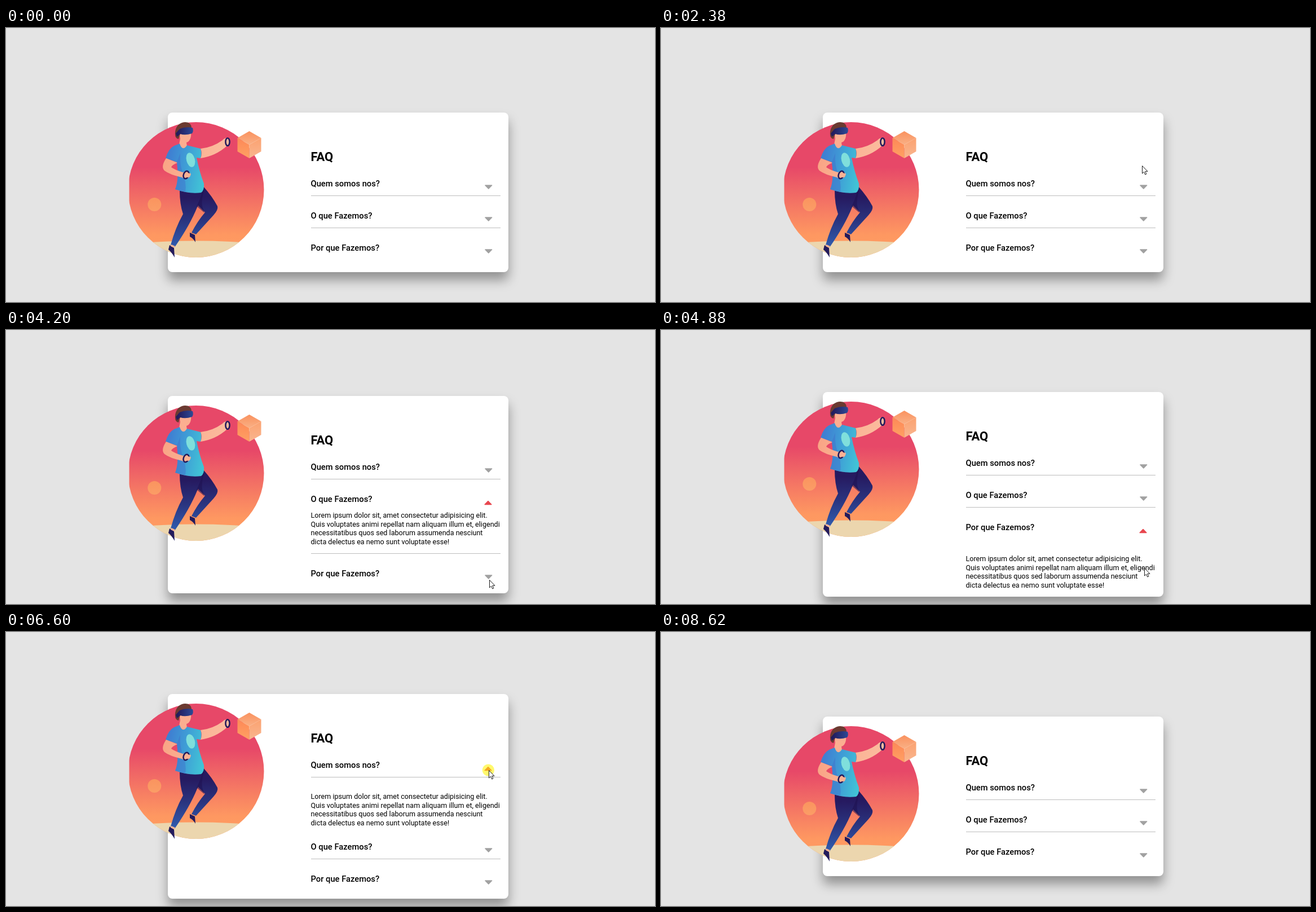
Write an HTML page with a canvas that moves like this. It is 1151 px wide and 486 px high and loops after 9220 ms.

```html
<!DOCTYPE html>
<html lang="pt">
<head>
<meta charset="utf-8">
<title>FAQ</title>
<style>
html, body { margin: 0; width: 100%; height: 100%; overflow: hidden; background: #e4e4e4; }
canvas { position: absolute; left: 0; top: 0; width: 1151px; height: 486px; }
h2, h3, p {
  position: absolute; left: 540.5px; margin: 0; white-space: nowrap;
  font-family: Roboto, "Noto Sans", sans-serif; color: #000;
}
h2 { font-size: 22px; font-weight: 700; line-height: 26px; }
h3 { font-size: 14.72px; font-weight: 500; line-height: 18px; }
p { font-size: 12.6px; font-weight: 400; line-height: 15.5px; }
</style>
</head>
<body>
<canvas id="scene"></canvas>
<h2>FAQ</h2>
<h3>Quem somos nos?</h3>
<h3>O que Fazemos?</h3>
<h3>Por que Fazemos?</h3>
<p>Lorem ipsum dolor sit, amet consectetur adipisicing elit.<br>Quis voluptates animi repellat nam aliquam illum et, eligendi<br>necessitatibus quos sed laborum assumenda nesciunt<br>dicta delectus ea nemo sunt voluptate esse!</p>
<canvas id="pointer"></canvas>
<script>
const W = 1151, H = 486, LOOP = 9220, REST_TOP = 150;
const dpr = window.devicePixelRatio || 1;

function context(id) {
  const c = document.getElementById(id);
  c.width = W * dpr;
  c.height = H * dpr;
  const g = c.getContext('2d');
  g.scale(dpr, dpr);
  return g;
}
const scene = context('scene'), pointer = context('pointer');
const title = document.querySelector('h2');
const questions = [...document.querySelectorAll('h3')];
const answer = document.querySelector('p');

// Card geometry per open item (0 = all closed)
const layouts = [
  { top: 150, height: 283, extra: 0 },
  { top: 110, height: 363, extra: 88, gap: 57 },
  { top: 117, height: 350, extra: 75, gap: 30 },
  { top: 110, height: 363, extra: 88, gap: 57 }
];

// [time, open item]
const toggles = [[0, 0], [1440, 1], [2380, 0], [3380, 2], [4540, 3], [5580, 2], [6270, 1], [6670, 0]];

// [from, to, strength] of the click highlight
const presses = [
  [1310, 1440, .57], [2300, 2380, .57], [3250, 3380, .57], [4470, 4540, .57],
  [5450, 5580, .57], [5580, 5650, .5], [6200, 6270, .57], [6600, 6670, .57]
];

const smooth = u => u * u * (3 - 2 * u);
const linear = u => u;

// Pointer moves: the position advances in equal ticks from first to last
const moves = [
  { from: 400, to: 1110, ticks: 11, ease: smooth, path: [[1006, 468], [945, 380], [880, 300], [857, 278]] },
  { from: 1620, to: 2100, ticks: 7, ease: smooth, path: [[857, 278], [856, 262], [853, 244]] },
  { from: 2500, to: 3180, ticks: 10, ease: smooth, path: [[853, 244], [855, 290], [855, 332]] },
  { from: 3580, to: 3720, ticks: 3, ease: smooth, path: [[855, 332], [855, 316]] },
  { from: 3920, to: 4200, ticks: 5, ease: smooth, path: [[855, 316], [847, 380], [857, 443]] },
  { from: 4740, to: 5380, ticks: 11, ease: smooth, path: [[857, 443], [857, 370], [853, 290]] },
  { from: 5850, to: 6130, ticks: 5, ease: smooth, path: [[853, 290], [854, 265], [856, 245]] },
  { from: 6870, to: 7780, ticks: 14, ease: linear,
    path: [[856, 245], [780, 157], [630, 200], [568, 320], [630, 404], [698, 370]] },
  { from: 7850, to: 8620, ticks: 12, ease: linear,
    path: [[698, 370], [770, 295], [880, 273], [1010, 350], [1115, 484]] }
];

// Catmull-Rom point on a list of points
function along(pts, u) {
  const n = pts.length - 1, s = Math.min(u * n, n - 1e-6), i = Math.floor(s), t = s - i;
  const at = k => pts[Math.max(0, Math.min(n, k))];
  return [0, 1].map(k => {
    const a = at(i - 1)[k], b = at(i)[k], c = at(i + 1)[k], d = at(i + 2)[k];
    return b + t * (c - a + t * (2 * a - 5 * b + 4 * c - d + t * (3 * (b - c) + d - a))) / 2;
  });
}

function pointerAt(t) {
  if (t < 400 || t >= 8620) return null;
  const m = moves.filter(m => t >= m.from).pop();
  const tick = Math.floor((t - m.from) / (m.to - m.from) * (m.ticks - 1) + 1e-6) + 1;
  return along(m.path, m.ease(Math.min(1, tick / m.ticks)));
}

function gradient(x0, y0, x1, y1, ...colors) {
  const g = scene.createLinearGradient(x0, y0, x1, y1);
  colors.forEach((c, i) => g.addColorStop(i / (colors.length - 1), c));
  return g;
}
function shape(d, fill) {
  scene.fillStyle = fill;
  scene.fill(new Path2D(d));
}
function oval(g, x, y, rx, ry, tilt, fill, line) {
  g.beginPath();
  g.ellipse(x, y, rx, ry, tilt, 0, 7);
  if (line) {
    g.lineWidth = line;
    g.strokeStyle = fill;
    g.stroke();
  } else {
    g.fillStyle = fill;
    g.fill();
  }
}

const sunset = gradient(0, 167, 0, 407, '#e74868', '#e74868', '#e74868', '#ef6466', '#f77f63', '#fe9861', '#ff9c60');
const trousers = gradient(0, 300, 0, 385, '#261a60', '#2a3580', '#3059ab');
const shirt = gradient(288, 240, 352, 250, '#3f80d2', '#3f9fd6', '#41c3d6');
const skin = gradient(280, 200, 395, 225, '#f9a283', '#fbb294', '#fbbd9f');
const navy = '#231b5c';

function drawArt() {
  scene.save();
  scene.beginPath();
  scene.rect(218.5, 150, 260, 270);
  scene.clip();

  scene.save();
  oval(scene, 337, 287, 120.5, 120, 0, sunset);
  scene.clip();
  shape('M218 383Q337 372 458 383V410H218Z', '#ecd6ae');
  scene.restore();
  oval(scene, 263.3, 313, 12, 12, 0, gradient(0, 301, 0, 325, '#fa945f', '#fb9d66'));

  shape('M431.500 183L452.500 195L431.500 207L410.500 195Z', gradient(0, 183, 0, 207, '#fa925f', '#f9b085'));
  shape('M410.500 195L431.500 207V231L410.500 219Z', gradient(0, 195, 0, 231, '#fd8857', '#ffa163'));
  shape('M452.500 195L431.500 207V231L452.500 219Z', gradient(0, 195, 0, 231, '#fba271', '#f9b68f'));

  // Legs and shoes
  shape('M328 290L350 281Q366 299 375 316Q377 322 368 332L337 366L329 363Q340 342 353 327L338 312Z', trousers);
  shape('M326 363L335 367L336 380Q332 373 326 370Z', navy);
  shape('M308 288Q328 295 348 290Q346 306 339 318Q326 350 299 389L292 385Q300 355 314 330Q308 312 308 288Z', trousers);
  shape('M348 290Q344 305 338 316L352 328L349 319Q345 308 352 286Z', 'rgba(30,18,80,.55)');
  shape('M290 385L298 390L299 407Q294 398 288 393Z', navy);
  shape('M293 384L300 387L298 390L292 387Z', '#f9b394');

  // Torso and arms
  shape('M345 214Q366 212 384 199Q390 192 396 198Q398 206 392 209Q372 227 345 231Q349 222 345 214Z', skin);
  shape('M307 184L328 186C329 193 326 202 320 203L321 210C317 217 311 215 307 207L309 196Z', '#fbae90');
  shape('M308 205Q313 220 321 208L345 214Q348 222 345 231L338 230Q343 255 351 276Q352 288 346 292Q325 295 300 286Q307 270 303 238L283 231Q288 214 298 209Z', shirt);
  shape('M303 238Q307 270 300 286L318 291Q321 275 312 252Q308 240 309 222Z', 'rgba(62,112,202,.45)');
  oval(scene, 327.5, 234, 7.5, 13, -.25, '#7fdfdc');
  shape('M284 231L304 239Q294 243 293 247Q300 252 314 256Q322 252 328 259Q326 267 318 268L312 265Q290 260 281 253Q274 246 284 231Z', skin);
  oval(scene, 393, 202, 3.6, 6.8, 0, navy, 2.6);
  oval(scene, 319.5, 260.5, 4.6, 7, .35, navy, 2.6);
  oval(scene, 322, 261, 5, 4, 0, '#fbb294');

  // Hair and headset
  shape('M300 190C299 180 303 171 312 168C320 165.500 329 168 329 177L327 180L311 182L306 197C302 196 300 193 300 190Z', '#6b3a31');
  shape('M308 179Q319 174 331 177Q333 183 330 187Q318 191 309 188L303 193L301 187Z', gradient(305, 0, 332, 0, '#231c5e', '#2c4a96'));
  scene.restore();
}

function drawArrow(y, open) {
  const x = open ? 855 : 855.8, dir = open ? -1 : 1;
  scene.beginPath();
  scene.moveTo(x - 5.8, y - 3 * dir);
  scene.lineTo(x + 5.8, y - 3 * dir);
  scene.lineTo(x, y + 3 * dir);
  scene.closePath();
  scene.fillStyle = scene.strokeStyle = open ? '#e8474f' : '#a1a1a1';
  scene.lineWidth = 1.6;
  scene.lineJoin = 'round';
  scene.fill();
  scene.stroke();
}

function showItem(open) {
  const { top, height, extra, gap } = layouts[open];
  scene.fillStyle = '#e4e4e4';
  scene.fillRect(0, 0, W, H);

  scene.save();
  scene.fillStyle = '#fff';
  scene.shadowColor = 'rgba(0,0,0,.36)';
  scene.shadowBlur = 20 * dpr;
  scene.shadowOffsetY = 14 * dpr;
  scene.beginPath();
  scene.roundRect(287, top, 604, height, 8);
  scene.fill();
  scene.restore();

  scene.save();
  scene.translate(0, top - REST_TOP);
  drawArt();
  scene.restore();

  title.style.top = top + 66 + 'px';
  questions.forEach((q, i) => {
    const item = i + 1;
    const y = top + 57 * i + (open && item > open ? extra : 0);
    q.style.top = y + 117 + 'px';
    drawArrow(y + (item === open ? 132.5 : 132), item === open);
    if (item < 3) {
      // The second item keeps its answer above the rule
      const drop = item === 2 && open === 2 ? extra : 0;
      scene.fillStyle = '#bdbdbd';
      scene.fillRect(541, y + 147 + drop, 336, 1);
    }
    if (item === open) answer.style.top = y + 117 + gap + 'px';
  });
  answer.style.visibility = open ? 'visible' : 'hidden';
}

const arrowhead = new Path2D('M.5 .5V14L3.600 11.200L5.700 16L7.900 15L5.800 10.300H10Z');

function drawPointer(t) {
  pointer.clearRect(0, 0, W, H);
  const pos = pointerAt(t);
  if (!pos) return;
  const [x, y] = pos.map(Math.round);
  const press = presses.find(([a, b]) => t >= a && t < b);
  if (press) oval(pointer, x - .6, y, 10.6, 10.6, 0, `rgba(255,245,0,${press[2]})`);
  pointer.save();
  pointer.translate(x, y);
  pointer.fillStyle = '#fff';
  pointer.strokeStyle = '#1c1c1c';
  pointer.lineWidth = 1;
  pointer.fill(arrowhead);
  pointer.stroke(arrowhead);
  pointer.restore();
}

let shown = -1;
const start = performance.now();
function frame() {
  const t = (performance.now() - start) % LOOP;
  const open = toggles.filter(([at]) => t >= at).pop()[1];
  if (open !== shown) showItem(shown = open);
  drawPointer(t);
  requestAnimationFrame(frame);
}
frame();
</script>
</body>
</html>
```
